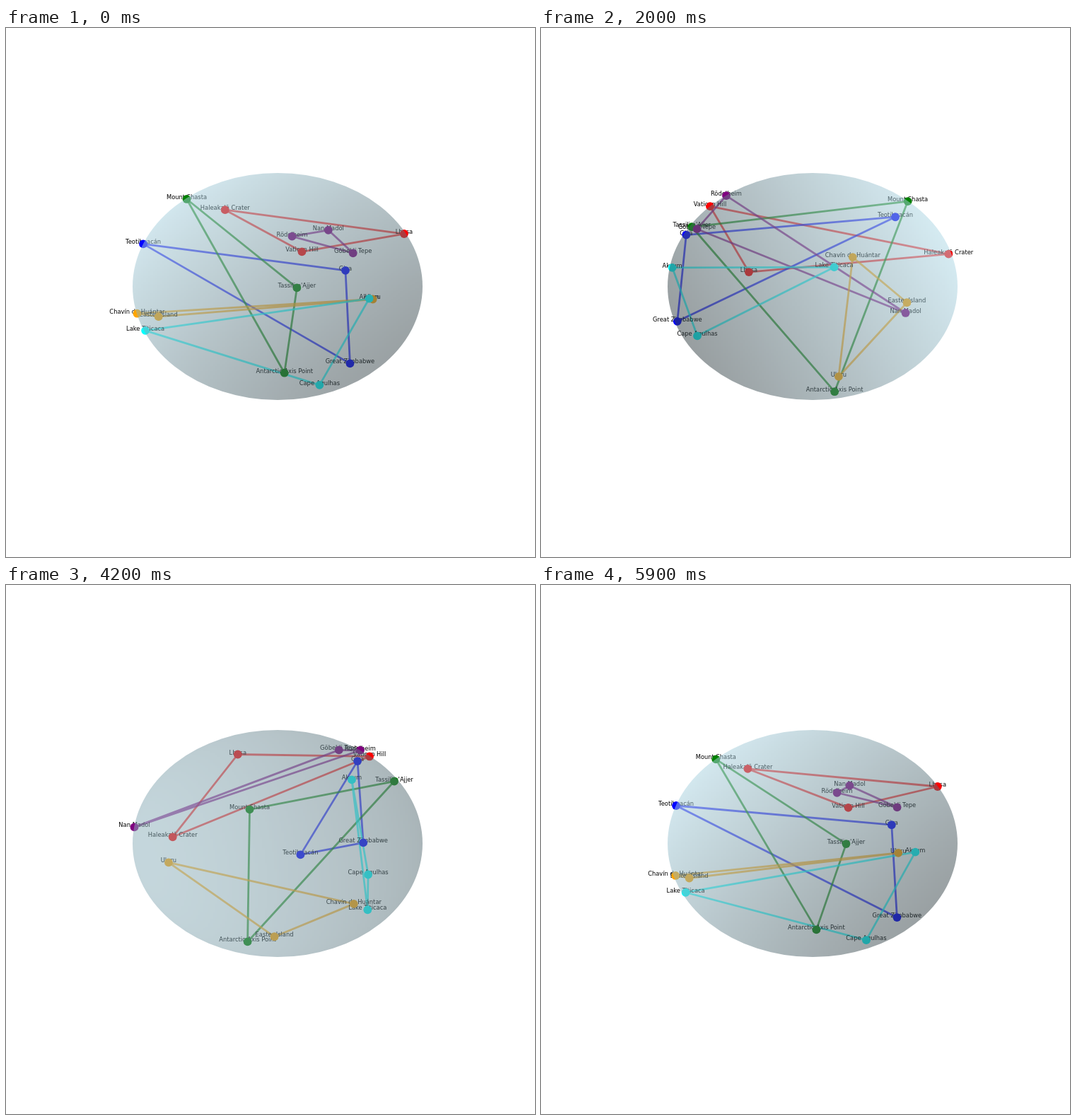
Write an HTML page with a canvas that moves like this. It is 748 px wide and 748 px high and loops after 6000 ms.

```html
<!DOCTYPE html>
<html lang="en">
<head>
<meta charset="utf-8">
<title>Rotating globe</title>
<style>
  html, body { margin: 0; width: 100%; height: 100%; overflow: hidden; background: #fff; }
  canvas { display: block; }
</style>
</head>
<body>
<canvas id="stage" width="748" height="748"></canvas>
<script>
const ctx = document.getElementById('stage').getContext('2d');
const { sin, cos, atan, tan, sqrt, max, floor, PI } = Math;
const RAD = PI / 180;

// Each triangle: colour, then [label, latitude, longitude] for its corners
const triangles = [
  ['red', ['Haleakalā Crater', 20.71, -156.25], ['Lhasa', 29.65, 91.1], ['Vatican Hill', 41.9, 12.45]],
  ['blue', ['Teotihuacán', 19.69, -98.84], ['Giza', 29.98, 31.13], ['Great Zimbabwe', -20.27, 30.93]],
  ['green', ['Mount Shasta', 41.41, -122.19], ["Tassili n'Ajjer", 24.5, 8], ['Antarctic Axis Point', -77.85, 166.67]],
  ['purple', ['Rödelheim', 50.12, 8.6], ['Nan Madol', 6.84, 158.33], ['Göbekli Tepe', 37.22, 38.92]],
  ['orange', ['Chavín de Huántar', -9.59, -77.18], ['Uluru', -25.34, 131.04], ['Easter Island', -27.11, -109.35]],
  ['cyan', ['Lake Titicaca', -15.8, -69.4], ['Aksum', 14.12, 38.72], ['Cape Agulhas', -34.83, 20]]
];

// Camera: 20° above the equator, globe flattened to 3/4 height
const ELEV = 20 * RAD, FLAT = 0.75, RADIUS = 204.7, PERSPECTIVE = 0.0545;
const CENTER = { x: 384, y: 364 };
const OUTLINE = { x: 384, y: 365.5, rx: 205, ry: 160.5 };

function project([label, lat, lon], azimuth) {
  const ring = cos(lat * RAD), turn = (lon - azimuth) * RAD;
  const toward = ring * cos(turn), z = FLAT * sin(lat * RAD);
  const depth = toward * cos(ELEV) + z * sin(ELEV);
  const scale = RADIUS / (1 - depth * PERSPECTIVE);
  return {
    label, depth,
    x: CENTER.x + scale * ring * sin(turn),
    y: CENTER.y - scale * (z * cos(ELEV) - toward * sin(ELEV))
  };
}

// Translucent shell: near and far surface, each 30% opaque, blended into one layer
const SIZE = 128, SPAN = 1.05;
const NEAR = 0.3, FAR = 0.21, OPACITY = NEAR + FAR;
const SHELL_COLOR = [173, 216, 230];
const SHELL_ELEV = atan(tan(ELEV) / FLAT);
const shell = document.createElement('canvas');
shell.width = shell.height = SIZE;
const shellCtx = shell.getContext('2d');
const shellData = shellCtx.createImageData(SIZE, SIZE);

function drawShell(azimuth) {
  const turn = (225 - azimuth) * RAD, flat = sqrt(8) / 3, lightZ = 1 / 3;
  const right = flat * sin(turn), toward = flat * cos(turn);
  const up = lightZ * cos(SHELL_ELEV) - toward * sin(SHELL_ELEV);
  const front = toward * cos(SHELL_ELEV) + lightZ * sin(SHELL_ELEV);
  const unit = i => ((i + 0.5) / SIZE * 2 - 1) * SPAN;

  for (let row = 0, p = 0; row < SIZE; row++) {
    const y = -unit(row);
    for (let col = 0; col < SIZE; col++) {
      const x = unit(col);
      const bulge = sqrt(max(0, 1 - x * x - y * y));
      const lit = x * right + y * up + front * bulge * (NEAR - FAR) / OPACITY;
      const shade = 0.65 + 0.35 * lit;
      for (const channel of SHELL_COLOR) shellData.data[p++] = channel * shade;
      shellData.data[p++] = 255 * OPACITY;
    }
  }
  shellCtx.putImageData(shellData, 0, 0);

  const { x, y, rx, ry } = OUTLINE;
  ctx.save();
  ctx.beginPath();
  ctx.ellipse(x, y, rx, ry, 0, 0, 2 * PI);
  ctx.clip();
  ctx.drawImage(shell, x - rx * SPAN, y - ry * SPAN, 2 * rx * SPAN, 2 * ry * SPAN);
  ctx.restore();
}

function draw(azimuth) {
  ctx.fillStyle = '#fff';
  ctx.fillRect(0, 0, 748, 748);

  const sites = [];
  ctx.lineWidth = 2.78;
  ctx.lineJoin = 'round';
  ctx.globalAlpha = 0.7;
  for (const [color, ...corners] of triangles) {
    const points = corners.map(corner => project(corner, azimuth));
    ctx.strokeStyle = color;
    ctx.beginPath();
    for (const { x, y } of points) ctx.lineTo(x, y);
    ctx.closePath();
    ctx.stroke();
    sites.push(...points.map(point => ({ ...point, color })));
  }
  ctx.globalAlpha = 1;

  ctx.font = '8.33px "DejaVu Sans", sans-serif';
  ctx.textAlign = 'center';
  ctx.fillStyle = '#000';
  for (const { label, x, y } of sites) ctx.fillText(label, x, y);

  sites.sort((a, b) => a.depth - b.depth);
  for (const { x, y, color } of sites) {
    ctx.fillStyle = color;
    ctx.beginPath();
    ctx.arc(x, y, 5.9, 0, 2 * PI);
    ctx.fill();
  }

  drawShell(azimuth);
}

// One turn in 6 s, in 60 steps of 6°
const start = performance.now();
let shown = -1;
function tick() {
  const step = floor((performance.now() - start) / 100) % 60;
  if (step !== shown) draw(6 * (shown = step));
  requestAnimationFrame(tick);
}
tick();
</script>
</body>
</html>
```
